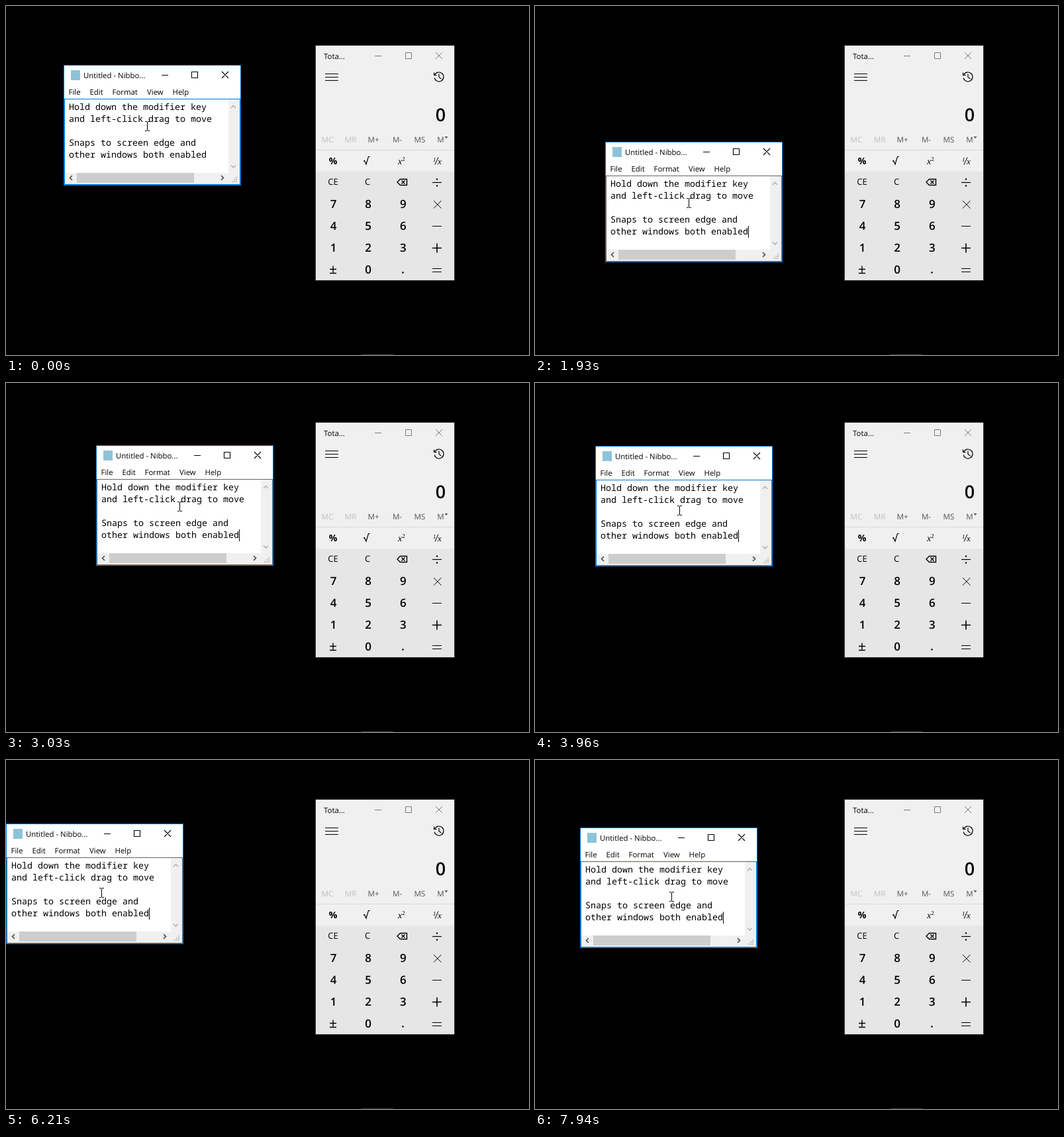
Animation of 790 by 527 pixels, one loop 8 s. Source, as an HTML page:

```html
<!DOCTYPE html>
<html lang="en">
<head>
<meta charset="utf-8">
<title>Window dragging</title>
<style>
  html, body { margin: 0; width: 100%; height: 100%; overflow: hidden; background: #000; }
  svg { display: block; width: 790px; height: 527px; }
  text { font-family: "Open Sans", "Noto Sans", sans-serif; text-rendering: geometricPrecision; white-space: pre; }
  .ui { font-size: 11.4px; fill: #000; }
  .mono text { font-family: "Noto Sans Mono", "DejaVu Sans Mono", monospace; font-size: 13.333px; }
  .mid { text-anchor: middle; }
  .mem { font-size: 11.6px; fill: #555; font-weight: 500; }
  .off { fill: #c0c0c0; font-weight: 400; }
  .num { font-size: 17px; font-weight: 600; }
  .math { font-family: "Liberation Serif", "Noto Serif", serif; font-style: italic; }
  .line { fill: none; stroke: #000; }
  .soft { stroke: #7a7a7a; }
  .pale { stroke: #b4b4b4; }
  .dark { stroke: #505050; }
</style>
</head>
<body>
<svg viewBox="0 0 790 527" xmlns="http://www.w3.org/2000/svg">
  <rect width="790" height="527" fill="#000"/>
  <rect x="537" y="526" width="48" height="1" fill="#3c3c3c"/>

  <g id="calc">
    <rect x="467.5" y="59.5" width="210" height="355" fill="#f0f0f0" stroke="#3a343c"/>
    <rect x="468" y="250" width="209" height="164" fill="#e6e6e6"/>
    <rect x="468" y="217" width="209" height="1" fill="#dadada"/>
    <text class="ui" x="480" y="80">Tota...</text>
    <path class="line soft" d="M557 75.5h10M603.5 70.5h9v9h-9zM649 70l10 10m0-10l-10 10"/>
    <path class="line" d="M482 102.5h20M482 107.5h20M482 112.5h20"/>
    <path class="line" stroke-width="1.2" d="M647.6 104.2a7 7 0 1 1-.4 4.5M646.6 100.5v4h4.2M654 102.5v5l3.5 2.5"/>
    <text class="mid" x="656.5" y="174" font-size="27" font-weight="600">0</text>

    <g class="mid mem">
      <text class="off" x="485.5" y="206">MC</text>
      <text class="off" x="520.5" y="206">MR</text>
      <text x="555" y="206">M+</text>
      <text x="591" y="206">M-</text>
      <text x="625" y="206">MS</text>
      <text x="656.5" y="206">M</text>
      <path d="M662.5 197h5l-2.5 3z"/>
    </g>

    <text class="mid" x="494" y="239" font-size="14" font-weight="700">%</text>
    <path class="line" stroke-width="1.2" d="M540 234.5l1.5-1 2.5 5.5 3.5-11.5h2.5"/>
    <text class="math" x="592" y="239" font-size="14">x<tspan dy="-5" font-size="9" font-style="normal">2</tspan></text>
    <text class="math" x="645" y="235" font-size="9" font-style="normal">1</text>
    <path class="line" d="M648 239.5l5-11"/>
    <text class="math" x="652" y="239" font-size="13">x</text>

    <text class="mid" x="494" y="270" font-size="13">CE</text>
    <text class="mid" x="546" y="270" font-size="13">C</text>
    <path class="line" stroke-width="1.4" d="M591 266l4.5-4.5h10v9h-10zM597.5 263.5l5 5m0-5l-5 5"/>
    <path class="line" stroke-width="1.2" d="M644 266.5h14"/>
    <circle cx="651" cy="261.5" r="1.2"/><circle cx="651" cy="271.5" r="1.2"/>

    <g class="mid num" id="digits"></g>
    <path class="line" d="M646 294l11.5 11.5m0-11.5l-11.5 11.5M644 332.5h14M644 396.5h14M644 401.5h14"/>
    <path class="line" stroke-width="1.6" d="M644 365.5h14M651 358.5v14"/>
    <path class="line" stroke-width="1.4" d="M489 397.5h10M494 392.5v10M489 403.5h10"/>
    <circle cx="599.5" cy="402.5" r="1.3"/>
  </g>

  <g id="pad">
    <rect width="268" height="182" fill="#0078d7"/>
    <rect x="1" y="1" width="266" height="50" fill="#fff"/>
    <rect id="edge" x="1" y="51" width="266" height="130"/>
    <rect x="2" y="52" width="264" height="128" fill="#fff"/>

    <rect x="11" y="8" width="14" height="15" fill="#8dc3d8"/>
    <text class="ui" x="30" y="20">Untitled - Nibbo...</text>
    <path class="line" stroke-width="1.1" d="M148 15.5h10M193.5 10.5h9v9h-9zM239 10l10 10m0-10l-10 10"/>
    <g class="ui">
      <text x="7.5" y="45">File</text>
      <text x="39.5" y="45">Edit</text>
      <text x="73.5" y="45">Format</text>
      <text x="126" y="45">View</text>
      <text x="164.5" y="45">Help</text>
    </g>

    <g class="mono">
      <text x="8" y="68">Hold down the modifier key</text>
      <text x="8" y="86">and left-click drag to move</text>
      <text x="8" y="122">Snaps to screen edge and</text>
      <text x="8" y="140">other windows both enabled</text>
    </g>
    <rect id="caret" x="216" y="127" width="1" height="18"/>

    <path fill="#f0f0f0" d="M249 52h17v128H2v-17h247z"/>
    <rect x="20" y="163" width="177" height="15" fill="#cdcdcd"/>
    <g stroke-width="1.7">
      <path class="line pale" d="M253 65l3.5-3.5 3.5 3.5M253 151.5l3.5 3.5 3.5-3.5"/>
      <path class="line dark" d="M13 167l-3.5 3.5 3.5 3.5M238 167l3.5 3.5-3.5 3.5"/>
    </g>
    <path fill="#bfbfbf" d="M260 169h2v2h-2zM257 172h2v2h-2zM260 172h2v2h-2zM254 175h2v2h-2zM257 175h2v2h-2zM260 175h2v2h-2z"/>
  </g>

  <path id="beam" class="line" d="M-3 -7.5h3M1 -7.5h3M.5 -7v13M-3 6.5h3M1 6.5h3"/>
</svg>

<script>
const LOOP = 8000, FIRST = 850, TICK = 77.7, SNAP = 13;
const $ = id => document.getElementById(id);

// key points of the window: tick, x, y
const drag = [
  [-1, 87, 89], [3, 68, 86], [8, 45, 126], [10, 57, 170], [14, 106, 205],
  [20, 159, 160], [21, 161, 151], [28, 136, 94], [32, 103, 88], [35, 91, 95],
  [50, 91, 95], [55, 56, 94], [61, 4, 96], [68, 4, 96],
  [75, 61, 98], [79, 79, 99], [84, 98, 100], [87, 98, 100], [91, 68, 102]
];

// pointer relative to the window, which it regrips between two drags
const grip = [[39, 126, 93], [40, 127, 98], [42, 133, 106], [43, 133, 106], [46, 138, 105]];

// monotone cubic interpolation, so rests and turning points stay put
function sample(keys, k, c) {
  const last = keys.length - 1;
  if (k <= keys[0][0]) return keys[0][c];
  if (k >= keys[last][0]) return keys[last][c];
  const slope = i => (keys[i + 1][c] - keys[i][c]) / (keys[i + 1][0] - keys[i][0]);
  const tangent = i => {
    if (i === 0 || i === last) return 0;
    const a = slope(i - 1), b = slope(i);
    return a * b > 0 ? 2 * a * b / (a + b) : 0;
  };
  let i = 0;
  while (k >= keys[i + 1][0]) i++;
  const h = keys[i + 1][0] - keys[i][0], u = (k - keys[i][0]) / h, v = 1 - u;
  return keys[i][c] * (1 + 2 * u) * v * v + keys[i + 1][c] * u * u * (3 - 2 * u)
    + h * u * v * (v * tangent(i) - u * tangent(i + 1));
}

function point(keys, k) {
  return [1, 2].map(c => Math.round(sample(keys, k, c)));
}

function place(id, x, y) {
  $(id).setAttribute("transform", `translate(${x} ${y})`);
}

function draw(t) {
  const k = Math.floor((t - FIRST) / TICK + 0.2);
  const [x, y] = point(drag, k), [dx, dy] = point(grip, k);
  place("pad", x < SNAP ? 0 : x, y);
  place("beam", x + dx, y + dy);

  const held = (k >= 0 && k < 40) || (k > 50 && k < 91);
  $("edge").setAttribute("fill", held ? "#646464" : "#0078d7");
  const blank = k < 2 || (k > 50 && k < 69);
  $("caret").setAttribute("visibility", blank ? "hidden" : "visible");
}

$("digits").innerHTML = [..."7894561230"].map((d, i) => {
  const col = d === "0" ? 1 : i % 3;
  return `<text x="${494.5 + 52.7 * col}" y="${305 + 33 * Math.floor(i / 3)}">${d}</text>`;
}).join("");

let start;
function frame(now) {
  start ??= now;
  draw((now - start) % LOOP);
  requestAnimationFrame(frame);
}
draw(0);
requestAnimationFrame(frame);
</script>
</body>
</html>
```
